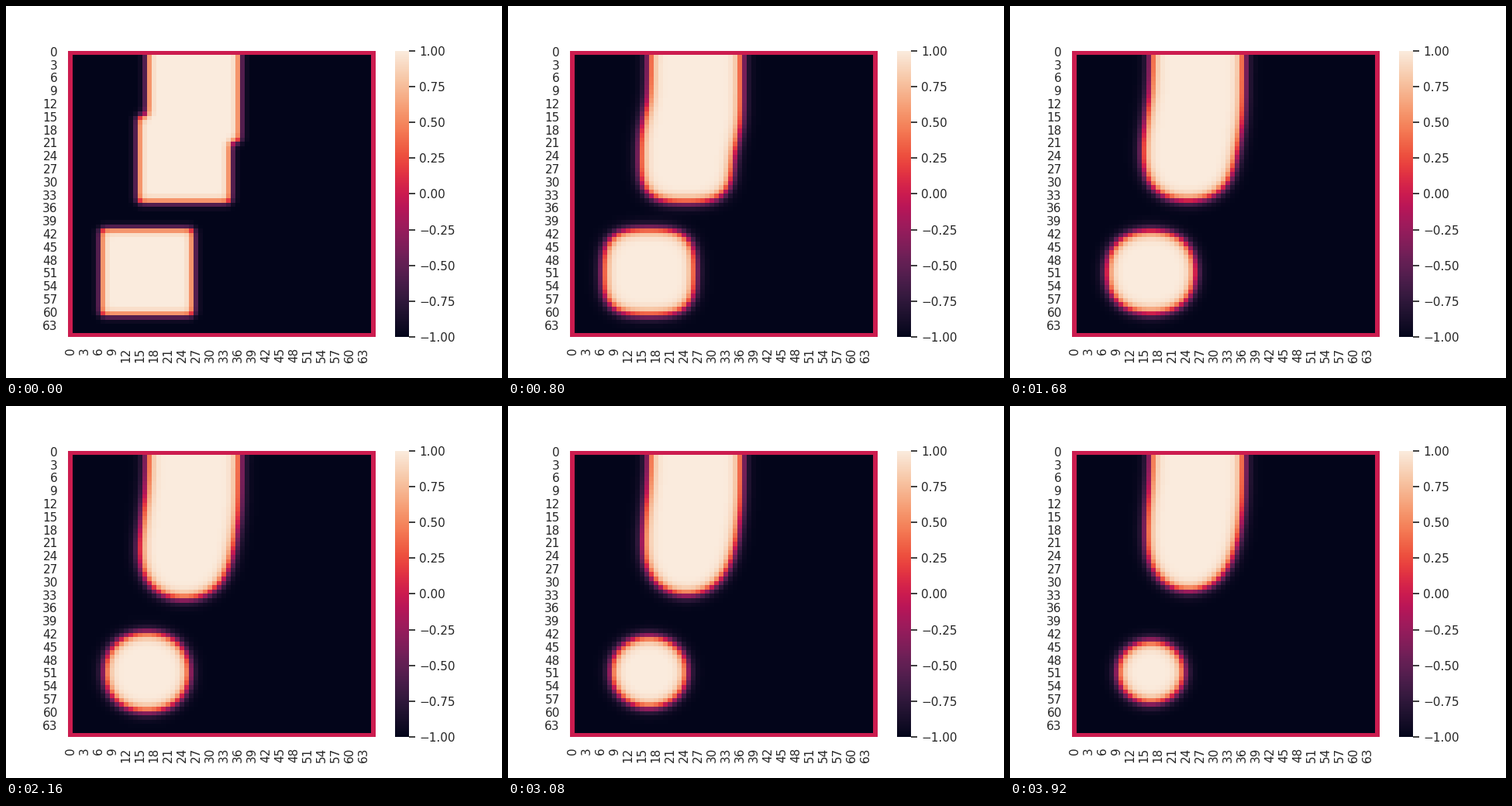
A matplotlib script that plays this animation: 640x480 px, repeating every 4000 ms.

```python
import numpy as np
import matplotlib.pyplot as plt
from matplotlib.animation import FuncAnimation
from matplotlib.colors import LinearSegmentedColormap

N = 64              # interior cells per side
FRAMES = 100
SUBSTEPS = 4
DT = 1e-4 * N**2 / SUBSTEPS   # time step in units of cell area
REACTION = 1.1      # (cell size / interface width) squared
INK = "0.15"

plt.rcParams.update({
    "font.family": "DejaVu Sans",
    "text.color": INK,
    "xtick.color": INK,
    "ytick.color": INK,
})

STOPS = [
    (0, "#03051a"), (1 / 11, "#221331"), (1 / 7, "#35193e"),
    (2 / 11, "#451c47"), (1 / 5, "#4c1d4b"), (1 / 4, "#611f53"),
    (3 / 11, "#691f55"), (2 / 7, "#701f57"), (4 / 11, "#921c5b"),
    (2 / 5, "#a11a5b"), (3 / 7, "#ad1759"), (5 / 11, "#b91657"),
    (1 / 2, "#cb1b4f"), (6 / 11, "#d92847"), (4 / 7, "#e13342"),
    (3 / 5, "#e83f3f"), (7 / 11, "#ed503e"), (5 / 7, "#f37651"),
    (8 / 11, "#f47d57"), (3 / 4, "#f4875e"), (4 / 5, "#f69c73"),
    (9 / 11, "#f6a47c"), (6 / 7, "#f6b48f"), (10 / 11, "#f7c9aa"),
    (1, "#faebdd"),
]
cmap = LinearSegmentedColormap.from_list("ember", STOPS, N=256)


def initial_field():
    """Three 20 x 20 squares of +1 on a background of -1."""
    u = -np.ones((N, N))
    for row, col in [(0, 16), (14, 14), (40, 6)]:
        u[row:row + 20, col:col + 20] = 1
    return u


def advance(u):
    """Allen-Cahn flow over one frame, with no flux through the walls."""
    for _ in range(SUBSTEPS):
        p = np.pad(u, 1, mode="edge")
        lap = p[:-2, 1:-1] + p[2:, 1:-1] + p[1:-1, :-2] + p[1:-1, 2:] - 4 * u
        u = u + DT * (lap + REACTION * (u - u**3))
    return u


def simulate():
    u = initial_field()
    fields = []
    for _ in range(FRAMES):
        u = advance(u)
        fields.append(np.pad(u, 1))   # frame of zeros around the field
    return fields


fields = simulate()

fig, ax = plt.subplots(figsize=(6.4, 4.8), dpi=100)
mesh = ax.pcolormesh(fields[0], cmap=cmap, vmin=-1, vmax=1)
ax.set(xlim=(0, N + 2), ylim=(N + 2, 0))
for spine in ax.spines.values():
    spine.set_visible(False)

bar = fig.colorbar(mesh, ax=ax, ticks=np.linspace(-1, 1, 9))
bar.outline.set_linewidth(0)
bar.ax.tick_params(labelsize=11, length=6, width=1.25, pad=3.5)

numbers = np.arange(0, N + 2, 3)
numbers = numbers[numbers <= 63]
ax.set_xticks(numbers + 0.5, numbers, rotation="vertical")
ax.set_yticks(numbers + 0.5, numbers, va="center")
ax.tick_params(labelsize=11, length=6, pad=3.5, bottom=False, left=False)


def draw(i):
    mesh.set_array(fields[i])
    return [mesh]


anim = FuncAnimation(fig, draw, frames=FRAMES, interval=40,
                     repeat=True, repeat_delay=0)
plt.show()
```
